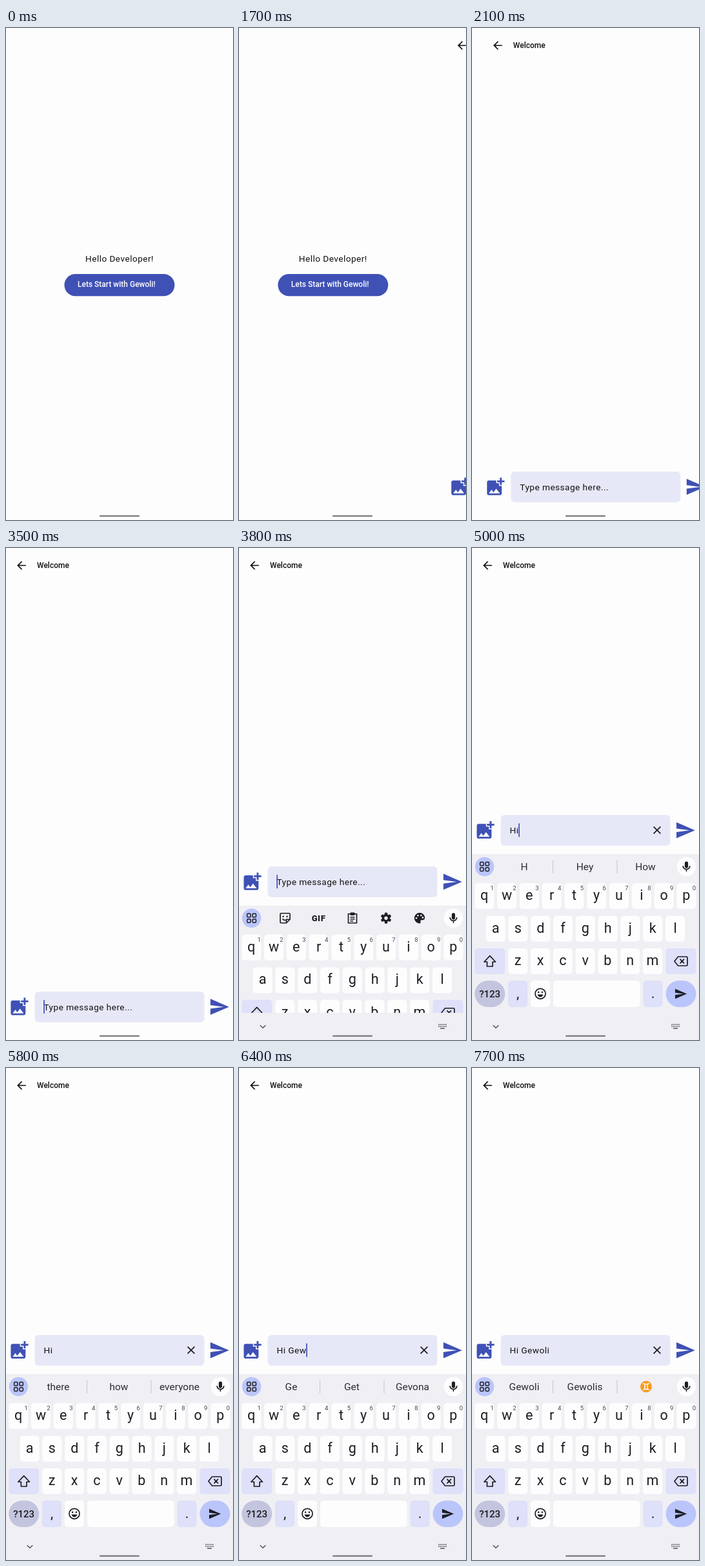
These frames come from a looping animation (352x762 px, 8000 ms). An HTML page:

```html
<!DOCTYPE html>
<html lang="en">
<head>
<meta charset="utf-8">
<title>Chat demo</title>
<style>
html, body { margin: 0; width: 100%; height: 100%; overflow: hidden; background: #fdfdfd; }
svg { display: block; width: 100%; height: 100%; }
text { font-family: Roboto, sans-serif; white-space: pre; }
.body { font-size: 13.7px; letter-spacing: .43px; fill: #111; }
.label { font-size: 12px; font-weight: 500; }
.key { font-size: 21.5px; text-anchor: middle; fill: #1d1d22; }
.digit { font-size: 9.5px; text-anchor: middle; fill: #45454c; }
.hint { font-size: 15.5px; text-anchor: middle; fill: #2c2c32; }
.line { fill: none; stroke: #1d1d22; stroke-width: 1.7; }
.brand { fill: #3f51b5; }
</style>
</head>
<body>
<svg id="stage" viewBox="0 0 352 762"></svg>
<script>
const LOOP = 8000, STEP = 100, W = 352, RISE = 273.5;
const KEY = '#fdfdfe', MOD = '#dfe0f9', ACCENT = '#bac5fb', PANEL = '#f0eff4', INK = '#1d1d22';

const typed = [
  [0, ''], [4700, 'H'], [5000, 'Hi'], [5200, 'Hi '], [6100, 'Hi G'],
  [6400, 'Hi Gew'], [6700, 'Hi Gewo'], [6800, 'Hi Gewol'], [7000, 'Hi Gewoli']
];
const hints = [
  [0, null], [4800, ['H', 'Hey', 'How']], [5100, ['Hi', 'Him', 'His']],
  [5400, ['there', 'how', 'everyone']], [6100, ['G', 'Go', 'Good']],
  [6400, ['Ge', 'Get', 'Gevona']], [6600, ['Gew', 'Get', 'Gewoli']],
  [6800, ['Gewo', 'Gewoli', 'Gewolis']], [7100, ['Gewol', 'Gewoli', 'Gewolis']],
  [7300, ['Gewoli', 'Gewolis', '']]
];
const cursorOn = [[0, false], [3500, true], [5800, false], [6100, true], [7700, false]];
const upper = [[0, false], [4600, true], [4700, false], [6000, true], [6100, false]];

const at = (list, t) => list.filter(e => e[0] <= t).pop()[1];

// cubic-bezier(.4, 0, .2, 1)
function ease(x) {
  if (x <= 0) return 0;
  if (x >= 1) return 1;
  let lo = 0, hi = 1, s;
  for (let i = 0; i < 30; i++) {
    s = (lo + hi) / 2;
    const bx = 1.2 * s * (1 - s) ** 2 + .6 * s * s * (1 - s) + s ** 3;
    if (bx < x) lo = s; else hi = s;
  }
  return s * s * (3 - 2 * s);
}

const rect = (x, y, w, h, r, fill, more = '') =>
  `<rect x="${x}" y="${y}" width="${w}" height="${h}" rx="${r}" fill="${fill}" ${more}/>`;
const circle = (x, y, r, fill) => `<circle cx="${x}" cy="${y}" r="${r}" fill="${fill}"/>`;
const text = (x, y, cls, str, more = '') => `<text x="${x}" y="${y}" class="${cls}" ${more}>${str}</text>`;
const group = (x, y, inner, more = '') => `<g transform="translate(${x} ${y})" ${more}>${inner}</g>`;
const line = (d, more = '') => `<path class="line" d="${d}" ${more}/>`;
const icon = (x, y, k, d, fill, more = '') =>
  `<path transform="translate(${x} ${y}) scale(${k}) translate(-12 -12)" d="${d}" fill="${fill}" ${more}/>`;

const SEND = 'M2 21L23 12 2 3V10l15 2-15 2z';
const BACK = 'M20 11H7.83l5.59-5.59L12 4l-8 8 8 8 1.41-1.41L7.83 13H20z';
const PHOTO = 'M19 7v3h-2V7h-3V5h3V2h2v3h3v2zM16 11V8h-3V5H5c-1.1 0-2 .9-2 2v12c0 1.1.9 2 2 2h12c1.1 0 2-.9 2-2v-8zM5 19l3-4 2 3 3-4 4 5z';
const RETURN = 'M19 7v4H5.83l3.58-3.59L8 6l-6 6 6 6 1.41-1.41L5.83 13H21V7z';

function letters(str, x0, y, digits) {
  return [...str].map((c, i) => {
    const x = x0 + i * 34.8;
    return rect(x - 15, y - 20, 30, 40, 5, KEY) + text(x, y + 6, 'key letter', c) +
      (digits ? text(x + 12, y - 9, 'digit', (i + 1) % 10) : '');
  }).join('');
}

function toolIcons() {
  const sticker = line('M-6 -7.5H6Q7.5 -7.5 7.5 -6V2L2 7.5H-6Q-7.5 7.5 -7.5 6V-6Q-7.5 -7.5 -6 -7.5zM2 7.5V2H7.5M-4 1Q-2 4 1 3') +
    circle(-3, -2.5, 1.2, INK) + circle(3, -2.5, 1.2, INK);
  const clip = line('M-6.5 -6.5H6.5V7.5H-6.5zM-3.5 -1.5H3.5M-3.5 1.5H3.5M-3.5 4.5H1') + rect(-3.5, -8.8, 7, 4.5, 1.2, INK);
  let gear = '';
  for (let a = 0; a < 360; a += 60) gear += rect(-2.1, -8.4, 4.2, 5, .8, INK, `transform="rotate(${a})"`);
  gear += circle(0, 0, 6.2, INK) + circle(0, 0, 2.7, PANEL);
  const palette = `<path d="M0 -8.2A8.2 8.2 0 1 0 0 8.2C2.5 8.2 1.2 5.5 1.5 4.2S3 3 4.5 3C7 3 8.2 1.5 8.2 -.8C8.2 -5 4.5 -8.2 0 -8.2z" fill="${INK}"/>` +
    [[-5, 0], [-2.6, -4], [2.4, -4.2], [5, -.8]].map(p => circle(...p, 1.35, PANEL)).join('');
  return group(71.5, 493.5, sticker) +
    text(123.5, 498.3, '', 'GIF', `font-size="13" font-weight="900" letter-spacing=".6" text-anchor="middle" fill="${INK}"`) +
    group(176, 493.5, clip) + group(228, 493.5, gear) + group(280, 493.5, palette);
}

function keyboard() {
  const grid = [[-7, -7], [1.4, -7], [-7, 1.4], [1.4, 1.4]]
    .map(p => rect(...p, 5.4, 5.4, 1.3, 'none', `stroke="${INK}" stroke-width="1.5"`)).join('');
  const mic = rect(-2.6, -8, 5.2, 10.2, 2.6, INK) + line('M-5.3 -1.2A5.3 5.3 0 0 0 5.3 -1.2M0 4V7.6');
  const smile = line('M8 0A8 8 0 1 1 -8 0A8 8 0 1 1 8 0z') + circle(-2.9, -2.3, 1.3, INK) + circle(2.9, -2.3, 1.3, INK) +
    `<path d="M-4.6 1.3H4.6Q3 5.2 0 5.2T-4.6 1.3z" fill="${INK}"/>`;
  const twins = circle(0, 0, 9, '#f99a1d') +
    line('M-5 -5.2Q0 -2.6 5 -5.2M-5 5.2Q0 2.6 5 5.2M-2 -4V4M2 -4V4', 'style="stroke:#fff;stroke-width:1.5"');
  return rect(0, 474, W, 600, 0, PANEL) +
    circle(19.5, 493.5, 14.7, ACCENT) + group(19.6, 493.6, grid) +
    circle(332.5, 493.5, 14.7, KEY) + group(332.5, 493.5, mic) +
    `<g id="tools">${toolIcons()}</g>` +
    `<g id="hints">${rect(125, 484, 1, 20, 0, '#c6c6cd')}${rect(224.5, 484, 1, 20, 0, '#c6c6cd')}` +
    [81, 175, 269].map(x => text(x, 499, 'hint', '')).join('') +
    `<g id="twins">${group(270, 493.5, twins)}</g></g>` +
    letters('qwertyuiop', 19.2, 539, true) + letters('asdfghjkl', 36.6, 589.7) +
    rect(4.2, 620, 47, 40, 5, MOD) +
    group(27.7, 640, line('M0 -8.3L8.8 1H4.3V8H-4.3V1H-8.8z', 'id="shift" stroke-linejoin="round"')) +
    letters('zxcvbnm', 71.2, 640) +
    rect(300.5, 620, 47, 40, 5, MOD) +
    group(324, 640, line('M-4.5 -7H8.5Q10 -7 10 -5.5V5.5Q10 7 8.5 7H-4.5L-10 0zM-1.5 -3.3L5 3.3M5 -3.3L-1.5 3.3')) +
    rect(4.2, 670, 47, 41, 20.5, '#c3c4de') + text(27.7, 696, '', '?123', `font-size="15" font-weight="500" text-anchor="middle" fill="${INK}"`) +
    rect(56, 670, 30, 41, 5, MOD) + text(71, 697, 'key', ',') +
    rect(91, 670, 30, 41, 5, KEY) + group(106, 690.3, smile) +
    rect(126, 670, 134.5, 41, 5, KEY) +
    rect(265.5, 670, 30, 41, 5, MOD) + text(280.5, 697, 'key', '.') +
    rect(300.5, 670, 47, 41, 20.5, ACCENT) +
    icon(324, 690.5, .8, RETURN, INK, 'id="enter"') + icon(323.6, 690.5, .86, SEND, INK, 'id="go"');
}

function navBar() {
  const dots = [738, 741, 744].map((y, i) => line(`M${i < 2 ? 309 : 312} ${y}H${i < 2 ? 322 : 319}`,
    `style="stroke:#55555b;stroke-width:1.5" stroke-dasharray="${i < 2 ? '1.5 .8' : '7'}"`)).join('');
  return `<rect id="navBg" width="${W}" height="60" fill="${PANEL}"/>` +
    line('M32.7 739.3L37 743.3L41.3 739.3', 'style="stroke:#4a4a50;stroke-width:1.3"') + dots;
}

const $ = id => document.getElementById(id);
$('stage').innerHTML =
  rect(0, 0, W, 762, 0, '#fdfdfd') +
  `<g id="home">${text(123, 361.5, 'body', 'Hello Developer!')}` +
  rect(90.5, 381, 171, 34.2, 17.1, '#3f51b5') +
  text(111, 400.5, 'label', 'Lets Start with Gewoli!', 'fill="#fff"') + '</g>' +
  '<g id="chat">' + icon(24, 27, .856, BACK, '#111') +
  text(48, 31.3, 'label', 'Welcome', 'fill="#111"') +
  '<g id="bar">' + rect(44.5, 687, 263, 47.5, 6, '#e7e8f7') +
  icon(20.3, 710.7, 1.43, PHOTO, '#3f51b5') + icon(330.7, 710.7, 1.37, SEND, '#3f51b5') +
  text(58.5, 715.5, 'body', '', 'id="entry"') +
  '<rect id="cursor" class="brand" y="700" width="1.7" height="21"/>' +
  group(287, 710.5, line('M-5.4 -5.4L5.4 5.4M5.4 -5.4L-5.4 5.4'), 'id="clear"') + '</g></g>' +
  `<g id="keys">${keyboard()}</g><g id="nav">${navBar()}</g>` +
  rect(145, 754.8, 62, 2, 1, '#6c6c70');

const hintTexts = [...document.querySelectorAll('.hint')];
const keyTexts = [...document.querySelectorAll('.letter')].map(el => [el, el.textContent]);
const show = (id, on) => $(id).setAttribute('display', on ? 'inline' : 'none');
const move = (id, x, y) => $(id).setAttribute('transform', `translate(${x} ${y})`);

function draw(t) {
  const slide = W * ease((t - 1583) / 700);
  const lift = RISE * ease((t - 3671) / 285);
  const str = at(typed, t), words = at(hints, t), caps = at(upper, t);

  move('home', -slide, 0);
  move('chat', W - slide, 0);
  move('bar', 0, -lift);
  move('keys', 0, RISE - lift);
  show('keys', lift > 0);
  show('nav', lift > 0);
  $('navBg').setAttribute('y', Math.max(720, 474 + RISE - lift));

  const entry = $('entry');
  entry.textContent = str;
  const end = str ? entry.getComputedTextLength() : 0;
  if (!str) entry.textContent = 'Type message here...';
  $('cursor').setAttribute('x', 58.2 + end);
  show('cursor', at(cursorOn, t));
  show('clear', str);
  show('enter', !str);
  show('go', str);

  show('tools', !words);
  show('hints', words);
  show('twins', words && !words[2]);
  hintTexts.forEach((el, i) => { el.textContent = words ? words[i] : ''; });
  keyTexts.forEach(([el, c]) => { el.textContent = caps ? c.toUpperCase() : c; });
  $('shift').style.fill = caps ? INK : 'none';
}

function tick() {
  const t = performance.now() % LOOP;
  draw(Math.floor(t / STEP) * STEP);
  requestAnimationFrame(tick);
}
tick();
</script>
</body>
</html>
```
